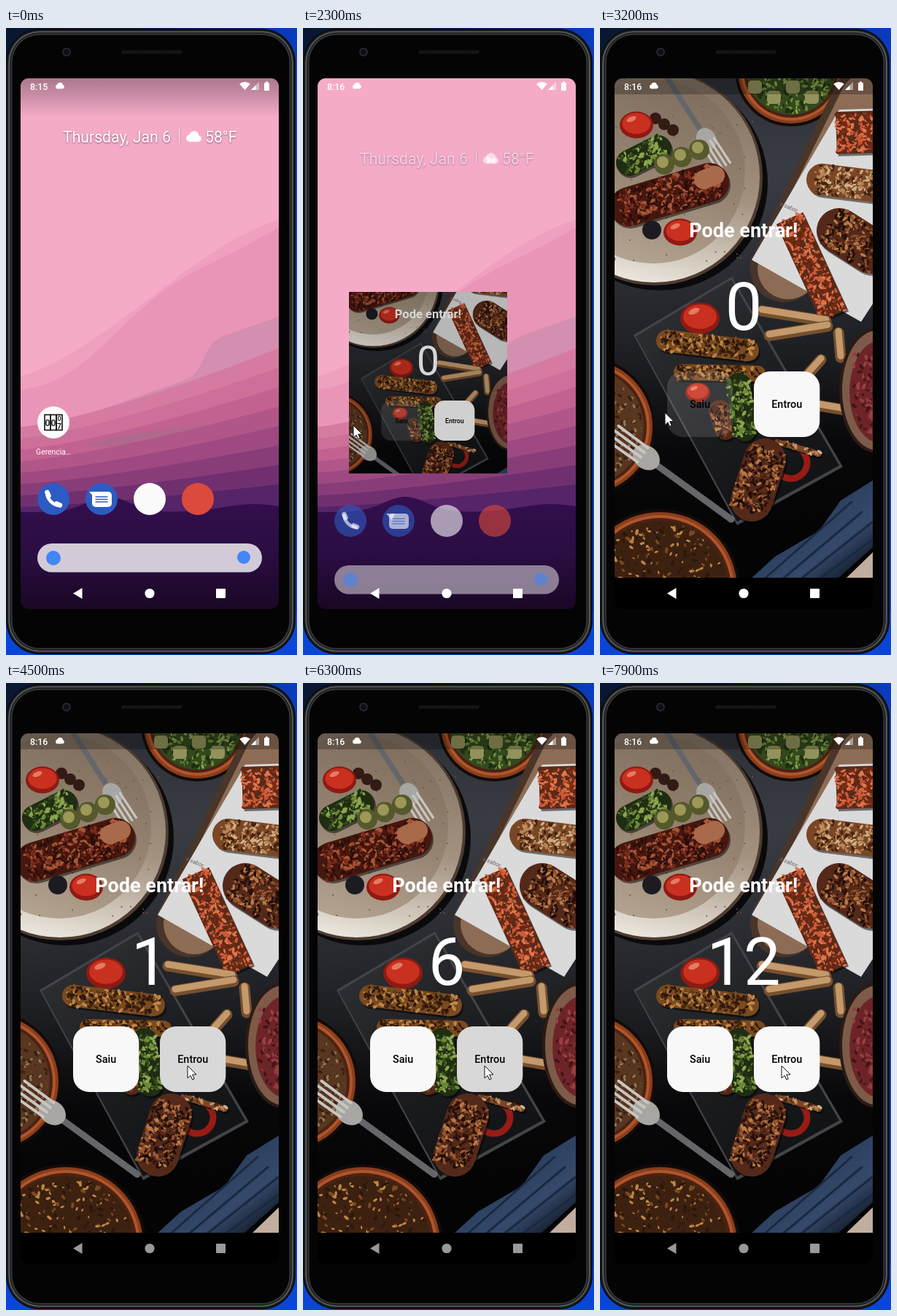
These frames come from a looping animation (399x860 px, 8000 ms). An HTML page with a canvas:

```html
<!DOCTYPE html>
<html lang="pt">
<head>
<meta charset="utf-8">
<title>Contador</title>
<style>
html, body { margin: 0; width: 100%; height: 100%; overflow: hidden; background: #000; }
canvas { display: block; width: 399px; height: 860px; }
</style>
</head>
<body>
<canvas id="stage"></canvas>
<script>
const W = 399, H = 860, LOOP = 8000;
const LEFT = 20, TOP = 69, SW = 354, SH = 728, PHOTO_H = 685;
const SCREEN = [LEFT, TOP, SW, SH];
const FONT = 'Roboto, sans-serif';
const dpr = window.devicePixelRatio || 1;

function makeLayer(canvas = document.createElement('canvas')) {
  canvas.width = W * dpr;
  canvas.height = H * dpr;
  const ctx = canvas.getContext('2d');
  ctx.scale(dpr, dpr);
  return ctx;
}

const mix = (a, b, k) => a + (b - a) * k;
const clamp = k => Math.min(1, Math.max(0, k));
const smooth = k => k * k * (3 - 2 * k);
const bump = (x, mid, width) => Math.exp(-(((x - mid) / width) ** 2));

let seed = 7;
function rnd() {
  seed = (seed * 16807) % 2147483647;
  return seed / 2147483647;
}

// ---------- drawing helpers ----------
function box(c, x, y, w, h, r, fill) {
  c.beginPath();
  c.roundRect(x, y, w, h, r);
  c.fillStyle = fill;
  c.fill();
}

function oval(c, x, y, rx, ry, fill, turn = 0) {
  c.beginPath();
  c.ellipse(x, y, rx, ry, turn, 0, 7);
  c.fillStyle = fill;
  c.fill();
}

const disc = (c, x, y, r, fill) => oval(c, x, y, r, r, fill);

function poly(c, fill, ...p) {
  c.beginPath();
  for (let i = 0; i < p.length; i += 2) c.lineTo(p[i], p[i + 1]);
  c.closePath();
  c.fillStyle = fill;
  c.fill();
}

function line(c, x0, y0, x1, y1, width, color, cap = 'round') {
  c.beginPath();
  c.moveTo(x0, y0);
  c.lineTo(x1, y1);
  c.lineWidth = width;
  c.lineCap = cap;
  c.strokeStyle = color;
  c.stroke();
}

function label(c, s, x, y, font, color = '#fff', align = 'center') {
  c.font = `${font} ${FONT}`;
  c.textAlign = align;
  c.fillStyle = color;
  c.fillText(s, x, y);
}

function fade(c, x0, y0, x1, y1, ...colors) {
  const g = c.createLinearGradient(x0, y0, x1, y1);
  colors.forEach((col, i) => g.addColorStop(i / (colors.length - 1), col));
  return g;
}

// ---------- phone body ----------
function drawPhone(c) {
  c.fillStyle = fade(c, 0, 0, W, 0, '#0a1730', '#0a1f5c', '#0b3cc0');
  c.fillRect(0, 0, W, H);
  c.fillStyle = '#0b45d8';
  c.fillRect(0, 800, W, 60);
  const rims = ['#0a0b0c', '#1c1e1f', '#5d6164', '#1c1e1f', '#36393b', '#040404'];
  rims.forEach((color, i) => {
    const inset = i * 1.7;
    box(c, inset, inset + 1, W - 2 - 2 * inset, H - 2 - 2 * inset, 46 - inset, color);
  });
  disc(c, 83, 33, 6, '#26282b');
  disc(c, 83, 33, 4, '#0e1016');
  for (let x = 159; x < 240; x += 2.5) line(c, x, 35, x + 2, 31, 0.9, '#343537');
}

// ---------- wallpaper ----------
// Fills everything below the curve y(u, x), with u running 0..1 across the screen.
function ridge(c, fill, y) {
  c.beginPath();
  c.moveTo(LEFT, H);
  for (let x = LEFT; x <= LEFT + SW; x += 3) c.lineTo(x, y((x - LEFT) / SW, x));
  c.lineTo(LEFT + SW, H);
  c.fillStyle = fill;
  c.fill();
}

function drawWallpaper(c) {
  c.fillStyle = '#f5abc8';
  c.fillRect(...SCREEN);
  const slope = u => mix(u, smooth(u), 0.5);
  ridge(c, '#f0a0bf', u => mix(478, 263, slope(u)));
  ridge(c, '#e995b7', u => mix(496, 271, slope(u)) + 8 * Math.sin(u * 9));
  ridge(c, '#d38eb0', u => mix(562, 438, u) - 42 / (1 + Math.exp((0.71 - u) * 60)));
  for (let i = 0; i < 8; i++) {
    const k = i / 7;
    const color = `rgb(${213 - 127 * k ** 1.5},${mix(123, 36, k)},${mix(162, 104, k)})`;
    ridge(c, color, u => mix(547 + 15.7 * i, 439 + 26.7 * i, u ** 1.3));
    if (i === 2) oval(c, 220, 558, 108, 8, '#b1688d', -0.13);
  }
  ridge(c, fade(c, 0, 650, 0, 797, '#330f4d', '#2a0d42', '#1a0725'),
    (u, x) => 664 - 21 * bump(x, 140, 42) - 11 * bump(x, 340, 60));
}

// ---------- food picture ----------
const ROAST = ['#2b110b', '#94542c', '#54291a', '#1d0d09', '#b97a48'];
const GLAZED = ['#2a0e0a', '#7c2c1d', '#45170f', '#a85838'];
const SPICE = ['#7a2a14', '#e0774c', '#5a2a18', '#cf5a38'];
const NUTS = ['#43230f', '#b98558', '#7a4726', '#d0ae84'];
const GOLD = ['#3d2110', '#bd8745', '#7a4a20', '#2b170c'];
const HERBS = ['#33491d', '#6c8a36', '#1f2d12', '#8da552'];

function fleck(c, x, y, color) {
  const s = 1.5 + 3 * rnd();
  oval(c, x, y, s, s * 0.5, color, rnd() * 3);
}

// A piece of food: a thick stroke sprinkled with flecks along its length.
function piece(c, x0, y0, x1, y1, width, tones, cap = 'round') {
  const dx = x1 - x0, dy = y1 - y0, len = Math.hypot(dx, dy);
  line(c, x0 + 2, y0 + 3, x1 + 2, y1 + 3, width, 'rgba(0,0,0,.5)', cap);
  line(c, x0, y0, x1, y1, width, tones[2], cap);
  const over = cap === 'round' ? width * 0.25 / len : 0;
  const count = (len + width / 2) * width / 14;
  for (let i = 0; i < count; i++) {
    const k = mix(-over, 1 + over, rnd()), side = (rnd() - 0.5) * width * 0.88 / len;
    fleck(c, x0 + dx * k - dy * side, y0 + dy * k + dx * side, tones[i % tones.length]);
  }
}

function finger(c, x0, y0, x1, y1) {
  line(c, x0, y0, x1, y1, 15, '#75502f');
  line(c, x0, y0 - 2, x1, y1 - 2, 9, '#c49a6c');
}

function tomato(c, x, y, r) {
  oval(c, x, y, r, r * 0.8, '#8f1a12');
  oval(c, x, y - 2, r * 0.85, r * 0.62, '#c9301f');
  oval(c, x - r * 0.3, y - r * 0.35, r * 0.3, r * 0.14, '#e57a62', -0.4);
}

function bowl(c, x, y, r, tones) {
  ['#120c0a', '#8a3d1b', '#b0552b', '#4b2213', tones[0]].forEach((color, i) => disc(c, x, y, r + 3 - i * 4, color));
  for (let i = 0; i < r * 5; i++) {
    const a = rnd() * 7, d = Math.sqrt(rnd()) * (r - 16);
    fleck(c, x + d * Math.cos(a), y + d * Math.sin(a), tones[i % tones.length]);
  }
}

function fork(c, x0, y0, x1, y1, size) {
  const len = Math.hypot(x1 - x0, y1 - y0);
  c.save();
  c.translate(x0, y0);
  c.rotate(Math.atan2(y1 - y0, x1 - x0));
  line(c, 0, 0, len - 3 * size, 0, size * 0.45, '#64666a');
  oval(c, len - 2.8 * size, 0, size, size * 0.8, '#a8a6a2');
  for (let i = -1.5; i < 2; i++)
    line(c, len - 2.5 * size, i * size * 0.4, len, i * size * 0.42, size * 0.2, '#c9c6c1');
  c.restore();
}

function drawFood(c) {
  c.fillStyle = fade(c, 200, TOP, 230, 700, '#2d3036', '#393c43', '#2d2f34', '#1d1e22', '#08080a', '#040405');
  c.fillRect(0, 0, W, H);

  // plate
  disc(c, 82, 212, 148, '#0a0a0c');
  disc(c, 75, 205, 148, '#4e3c30');
  disc(c, 74, 204, 145, fade(c, 120, 80, 60, 350, '#857565', '#a39280', '#ebe6dd'));
  disc(c, 73, 197, 126, fade(c, 130, 80, 50, 325, '#7f6e5e', '#958370', '#b3a391'));
  for (let i = 0; i < 60; i++) disc(c, mix(LEFT, 210, rnd()), mix(TOP, 340, rnd()), 1, '#6a5848');
  fork(c, 88, 62, 170, 190, 16);
  piece(c, 40, 185, 80, 165, 36, HERBS);
  piece(c, 40, 245, 150, 212, 54, GLAZED);
  line(c, 142, 208, 158, 202, 26, '#a96a4b');
  for (let i = 0; i < 3; i++) {
    disc(c, 88 + i * 24, 187 - i * 10, 14, '#55592c');
    disc(c, 86 + i * 24, 184 - i * 10, 8, '#9c9857');
    disc(c, 76 + i * 12, 124 + i * 8, 8, '#331a15');
  }
  tomato(c, 50, 133, 23);
  tomato(c, 110, 280, 23);
  disc(c, 71, 277, 13, '#1d1b22');

  bowl(c, 262, 58, 74, HERBS);
  for (let i = 0; i < 4; i++) box(c, 203 + i * 26, 72 + (i % 2) * 14, 19, 18, 5, '#93925b');

  // board, paper and cuts
  line(c, 366, 96, 252, 330, 92, '#4a3529');
  line(c, 370, 102, 258, 330, 84, '#8d6c56');
  poly(c, '#dadadb', 328, 112, 208, 318, 358, 403, W, 340, W, 110);
  c.save();
  c.translate(246, 243);
  c.rotate(0.4);
  label(c, 'a sabor', 0, 0, 'italic 8px', '#66666a', 'left');
  c.restore();
  piece(c, 324, 144, 390, 142, 58, SPICE, 'butt');
  piece(c, 305, 208, 385, 218, 44, NUTS);
  piece(c, 328, 278, 372, 306, 62, ROAST);
  piece(c, 260, 261, 321, 394, 40, SPICE, 'butt');

  // slate
  poly(c, '#424448', 46, 421, 181, 341, 333, 602, 188, 682);
  poly(c, fade(c, 80, 400, 250, 650, '#2b2d30', '#1c1d20', '#121315'), 49, 423, 180, 345, 328, 600, 188, 677);
  tomato(c, 137, 398, 27);
  tomato(c, 134, 500, 17);
  piece(c, 92, 429, 203, 442, 30, GOLD);
  piece(c, 112, 472, 216, 474, 22, GOLD);
  piece(c, 164, 525, 172, 550, 30, ROAST);
  finger(c, 222, 388, 310, 402);
  finger(c, 232, 422, 312, 409);
  finger(c, 327, 418, 330, 452);
  finger(c, 286, 474, 303, 455);
  finger(c, 295, 517, 336, 524);
  piece(c, 190, 490, 198, 550, 34, HERBS);
  c.beginPath();
  c.arc(262, 596, 22, -1.2, 2.2);
  c.lineWidth = 9;
  c.strokeStyle = '#961c15';
  c.stroke();
  piece(c, 243, 568, 300, 584, 8, NUTS);
  piece(c, 226, 592, 208, 648, 58, ROAST);

  // cured meat on its plate
  oval(c, 379, 497, 51, 86, '#2b1b15');
  oval(c, 380, 497, 48, 82, '#7d5b48');
  oval(c, 384, 499, 42, 70, '#6d2428');
  for (let i = 0; i < 60; i++) fleck(c, mix(348, 374, rnd()), mix(445, 555, rnd()), i % 2 ? '#96403f' : '#451418');

  bowl(c, -20, 547, 93, ['#58361f', '#937654', '#3b2013']);
  fork(c, 180, 674, 18, 556, 20);
  bowl(c, 82, 770, 107, GOLD);

  // cloth
  poly(c, fade(c, 290, 680, 345, 750, '#2c4060', '#35496a', '#131c2b'),
    206, 756, 240, 725, 300, 690, 330, 648, W, 605, W, 690, 325, 756);
  for (let i = 0; i < 4; i++) line(c, 225 + i * 25, 756, 345 + i * 14, 650 + i * 14, 3, '#1b2940');
  poly(c, '#c2ae9f', 336, 756, W, 695, W, 756);
}

// ---------- interface ----------
function drawCloud(c, x, y, s, fill) {
  disc(c, x - 3.2 * s, y + s, 3 * s, fill);
  disc(c, x + 0.2 * s, y - s, 4 * s, fill);
  disc(c, x + 3.6 * s, y + 1.4 * s, 2.6 * s, fill);
  c.fillRect(x - 3.2 * s, y, 6.8 * s, 4 * s);
}

function drawStatus(c, clock) {
  label(c, clock, 33, 84.5, '500 12.4px', '#fff', 'left');
  drawCloud(c, 74, 79.5, 0.95, '#fff');
  c.beginPath();
  c.moveTo(327.5, 85);
  c.arc(327.5, 85, 11, -2.3, -0.84);
  c.fill();
  poly(c, 'rgba(255,255,255,.45)', 336, 85, 347, 85, 347, 74);
  poly(c, '#fff', 336, 85, 342.5, 85, 342.5, 78.5);
  box(c, 354, 75, 7, 11, 1, '#fff');
  c.fillRect(356, 73.5, 3, 2);
}

function drawNav(c, alpha) {
  c.save();
  c.globalAlpha = alpha;
  poly(c, '#fff', 92, 775.5, 104.5, 768, 104.5, 783);
  disc(c, 197, 775.5, 6.6, '#fff');
  box(c, 288, 769, 13, 13, 1, '#fff');
  c.restore();
}

function drawAppIcon(c, x, y) {
  disc(c, x, y, 22, '#fcfcfc');
  c.strokeStyle = '#111';
  c.lineWidth = 1.6;
  for (let i = -1; i < 2; i++) {
    c.strokeRect(x + i * 8 - 4, y - 10.5, 8, 21);
    if (i < 1) label(c, '0', x + i * 8, y + 4.5, '500 12px', '#111');
  }
  label(c, '0', x + 8, y - 2, '500 9px', '#111');
  label(c, '7', x + 8, y + 9, '500 11px', '#111');
  label(c, 'Gerencia…', x, y + 44, '10.4px');
}

function drawHome(c, shift, alpha, launching) {
  if (!launching) {
    c.fillStyle = fade(c, 0, 69, 0, 120, 'rgba(40,30,40,.36)', 'rgba(40,30,40,.2)', 'rgba(40,30,40,.02)');
    c.fillRect(LEFT, TOP, SW, 51);
  }
  c.save();
  c.translate(0, shift);
  c.globalAlpha = alpha;
  c.shadowColor = 'rgba(60,20,50,.6)';
  c.shadowBlur = 2.5 * dpr;
  c.shadowOffsetY = dpr * 0.6;
  label(c, 'Thursday, Jan 6', 78, 157, '21.2px', '#fff', 'left');
  label(c, '58°F', 273, 157, '21.2px', '#fff', 'left');
  c.fillRect(237, 138, 1, 20);
  c.shadowColor = 'transparent';
  drawCloud(c, 257.5, 149.5, 1.65, '#fff');
  if (!launching) drawAppIcon(c, 65, 541);

  ['#2c5bc4', '#2c5bc4', '#fafafa', '#dc4a3c'].forEach((color, i) => disc(c, 65 + 66 * i, 646, 22, color));
  c.beginPath();
  c.arc(75, 636, 19, 1.6, 3.1);
  c.lineWidth = 4.6;
  c.strokeStyle = '#fff';
  c.stroke();
  line(c, 56.5, 637, 58.5, 641.5, 6.5, '#fff');
  line(c, 69.5, 652.5, 74, 654.5, 6.5, '#fff');
  poly(c, '#fff', 114, 636, 126, 636, 122, 645);
  box(c, 118, 636, 27, 21, 5, '#fff');
  for (let i = 0; i < 3; i++) line(c, 123, 643 + 3.5 * i, 139, 643 + 3.5 * i, 1.4, '#2c5bc4');

  box(c, 43, 707, 308, 39.5, 20, 'rgba(225,220,228,.92)');
  disc(c, 65, 727, 10, '#4285f4');
  disc(c, 326, 726, 9, '#4285f4');
  c.restore();
}

function drawButton(c, s, x, fill) {
  box(c, x, 471, 90.3, 90, 22, fill);
  label(c, s, x + 45.2, 521.3, '500 14.4px', '#000');
}

function drawApp(c, count, press) {
  c.fillStyle = '#000';
  c.fillRect(...SCREEN);
  c.drawImage(food.canvas, 0, 0, W, H);
  c.fillStyle = 'rgba(0,0,0,.25)';
  c.fillRect(LEFT, TOP, SW, 22);
  label(c, 'Pode entrar!', 196.8, 287, 'bold 27px');
  label(c, count, 197, 413.5, '90px');
  const shade = Math.round(mix(248, 216, press));
  drawButton(c, 'Saiu', 92, count ? '#f8f8f8' : 'rgba(255,255,255,.12)');
  drawButton(c, 'Entrou', 211, `rgb(${shade},${shade},${shade})`);
}

// Opening window: k = 0 is the small card, k = 1 almost fills the screen.
function drawOpening(c, k) {
  const s = mix(0.612, 0.983, k);
  c.save();
  c.beginPath();
  c.rect(mix(63, 23, k), mix(362, 83, k), mix(217, 348, k), mix(249, 710, k));
  c.clip();
  c.save();
  c.translate(mix(171.5, 197, k) - 197 * s, mix(222.7, 13.2, k));
  c.scale(s, s);
  drawApp(c, 0, 0);
  c.restore();
  c.fillStyle = `rgba(0,0,0,${0.16 * (1 - k)})`;
  c.fillRect(0, 0, W, H);
  c.restore();
}

// ---------- timing ----------
const OPEN = 2300, FULL = 2700;
const TAPS = [4500, 4900, 5300, 5800, 6100, 6300, 6500, 6800, 7000, 7300, 7500, 7700];

// The button darkens while held and fades back after release.
function pressAt(t) {
  return Math.max(...TAPS.map((up, i) => {
    const hold = i ? Math.min(200, up - TAPS[i - 1] - 100) : 0;
    return t < up - hold ? 0 : t < up ? 1 : clamp(1 - (t - up) / 200);
  }));
}

const MOVES = [
  { from: 1200, to: 2000, x: 69, y: 545 },
  { from: 2700, to: 3300, x: 93, y: 524 },
  { from: 3500, to: 4200, x: 249, y: 525 }
];

function drawPointer(c, t) {
  if (t < 1300) return;
  let x = 43, y = 190;
  for (const m of MOVES) {
    const k = clamp((t - m.from) / (m.to - m.from));
    x = mix(x, m.x, k);
    y = mix(y, m.y, k);
  }
  c.save();
  c.translate(x, y);
  poly(c, '#fff', 0, 0, 0, 17, 4, 13.4, 6.6, 19, 9.2, 17.9, 6.7, 12.2, 12, 12);
  c.lineWidth = 1;
  c.strokeStyle = '#111';
  c.stroke();
  c.restore();
}

const stage = makeLayer(document.getElementById('stage'));
const base = makeLayer(), wall = makeLayer(), sharp = makeLayer(), food = makeLayer();
drawPhone(base);
drawWallpaper(wall);
drawFood(sharp);
food.beginPath();
food.rect(LEFT, TOP, SW, PHOTO_H);
food.clip();
food.filter = `blur(${0.7 * dpr}px)`;
food.drawImage(sharp.canvas, 0, 0, W, H);

function draw(t) {
  const c = stage;
  c.drawImage(base.canvas, 0, 0, W, H);
  c.save();
  c.beginPath();
  c.roundRect(...SCREEN, 11);
  c.clip();
  if (t < FULL) {
    const launching = t >= OPEN;
    const k = t < 2400 ? 0 : t < 2600 ? 0.78 : 1;
    c.drawImage(wall.canvas, 0, 0, W, H);
    drawHome(c, launching ? 30 : 0, launching ? 0.6 * (1 - k) : 1, launching);
    if (launching) drawOpening(c, k);
  } else {
    drawApp(c, TAPS.filter(up => t >= up).length, pressAt(t));
  }
  drawStatus(c, t < OPEN ? '8:15' : '8:16');
  drawNav(c, mix(1, 0.6, clamp((t - 3700) / 300)));
  c.restore();
  drawPointer(c, t);
}

const start = performance.now();
function tick() {
  draw((performance.now() - start) % LOOP);
  requestAnimationFrame(tick);
}
tick();
</script>
</body>
</html>
```
